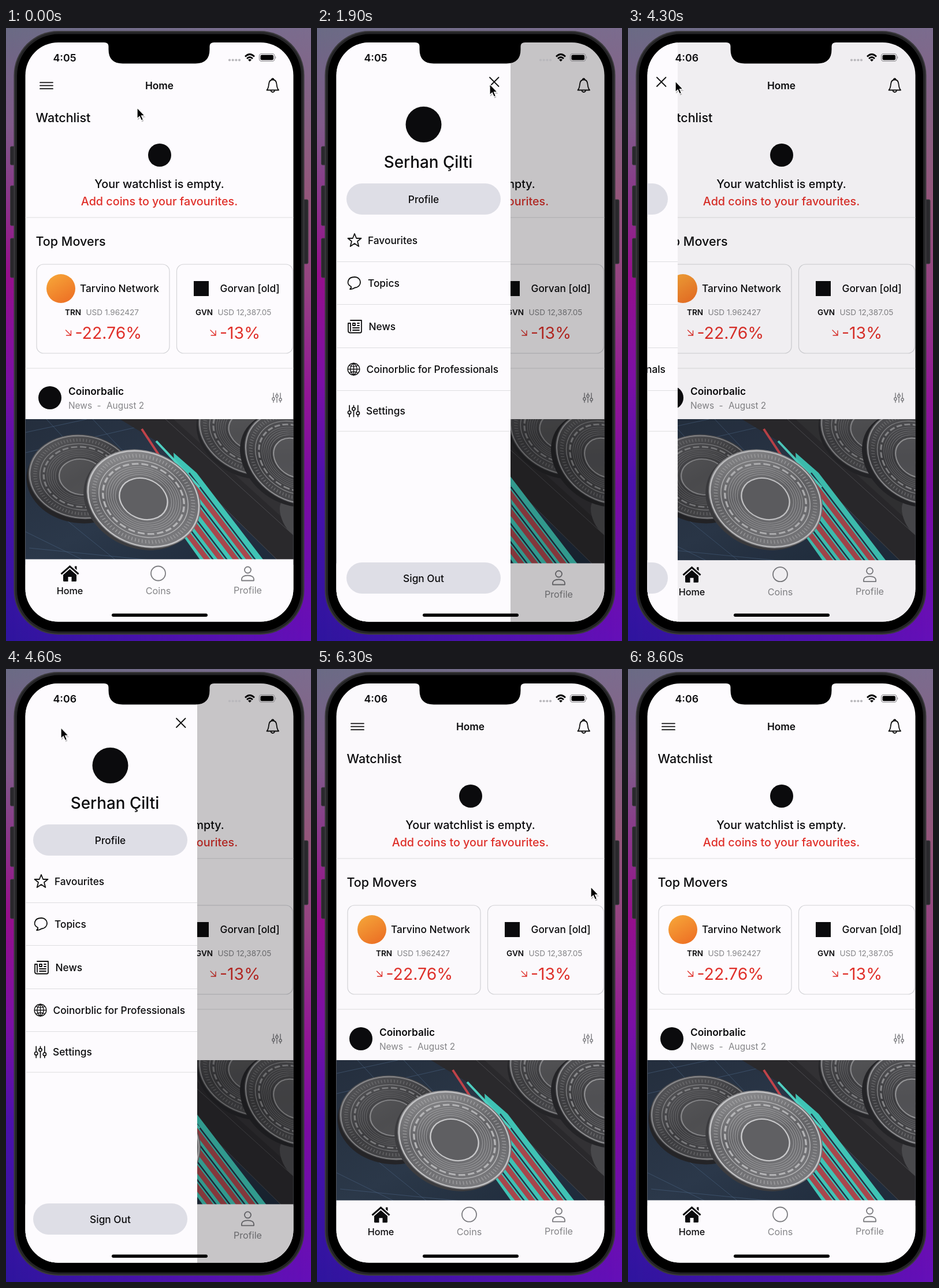
An HTML page for the animation above (8700 ms loop, 528 px wide and 1061 px high).

```html
<!DOCTYPE html>
<html lang="en">
<head>
<meta charset="utf-8">
<title>Drawer menu</title>
<style>
@property --p { syntax: "<number>"; inherits: true; initial-value: 0; }
html, body { margin: 0; width: 100%; height: 100%; overflow: hidden; background: #5a1a90; }
svg.stage {
  display: block; width: 100%; height: 100%;
  font-family: Inter, "Liberation Sans", sans-serif; font-size: 17.3px;
  /* critically damped spring */
  animation: slide 8.7s infinite linear(0, .2, .49, .706, .841, .917, .958, .979, .99, .995, 1);
}
text { fill: #0b0b0d; white-space: pre; }
.m { font-weight: 500; }
.b { font-weight: 600; }
.mid { text-anchor: middle; }
.grey { fill: #858588; }
.red { fill: #e0302a; }
.h2 { font-size: 21.5px; }
.lead { font-size: 19.75px; }
.small { font-size: 13.6px; }
.news { font-size: 15.4px; }
.pct { font-size: 28.4px; }
.tab { font-size: 16.2px; }
.clock { font-size: 17.8px; }
.ink, .soft { fill: none; stroke: #111; stroke-width: 1.8; stroke-linecap: round; stroke-linejoin: round; }
.soft { stroke: #7c7c80; }
.thin { stroke-width: 1.4; }
.fall { fill: none; stroke: #e0302a; stroke-width: 1.4; stroke-linecap: round; }
.rule { stroke: #dddde0; stroke-width: 1.2; }
.card { fill: none; stroke: #d4d4d8; stroke-width: 1.2; }
.paper { fill: #fdfbfe; }
.drawer { transform: translateX(calc((var(--p) - 1) * 327px)); }
.dim { opacity: calc(var(--p) * .22); }
.tabs { transform: translateY(calc(var(--p) * 7px)); }
.cursor { animation: point 8.7s infinite ease-in-out; }
.early { animation: early 8.7s infinite step-end; }
.late { animation: late 8.7s infinite step-end; }
@keyframes slide {
  0%, 11.494% { --p: 0; }
  16.667%, 31.736% { --p: 1; }
  36.908%, 48.851% { --p: 0; }
  54.023%, 68.966% { --p: 1; }
  74.138%, 100% { --p: 0; }
}
@keyframes point {
  0% { transform: translate(227px, 138px); }
  8%, 13.2% { transform: translate(70px, 98px); }
  20.7%, 21.9% { transform: translate(299px, 97px); }
  29.9%, 36.8% { transform: translate(305px, 96px); }
  46%, 51.7% { transform: translate(82px, 92px); }
  60.9%, 80.5% { transform: translate(474px, 377px); }
  88.5%, 100% { transform: translate(545px, 430px); }
}
@keyframes early { 0% { opacity: 1; } 41.4%, 100% { opacity: 0; } }
@keyframes late { 0% { opacity: 0; } 41.4%, 100% { opacity: 1; } }
</style>
</head>
<body>
<svg class="stage" viewBox="0 0 528 1061" preserveAspectRatio="none">
  <defs>
    <linearGradient id="wallL" x2="0" y2="1">
      <stop offset="0" stop-color="#6b6b85"/>
      <stop offset=".16" stop-color="#805a8a"/>
      <stop offset=".4" stop-color="#960f8c"/>
      <stop offset=".58" stop-color="#7a10a5"/>
      <stop offset=".74" stop-color="#4a12ac"/>
      <stop offset="1" stop-color="#2e159e"/>
    </linearGradient>
    <linearGradient id="wallR" x2="0" y2="1">
      <stop offset="0" stop-color="#7b6c8e"/>
      <stop offset=".28" stop-color="#94567a"/>
      <stop offset=".42" stop-color="#954482"/>
      <stop offset=".6" stop-color="#921696"/>
      <stop offset=".75" stop-color="#7a0ca2"/>
      <stop offset="1" stop-color="#650fb8"/>
    </linearGradient>
    <linearGradient id="fade">
      <stop offset="0" stop-color="#000"/><stop offset="1" stop-color="#fff"/>
    </linearGradient>
    <mask id="side"><rect width="528" height="1061" fill="url(#fade)"/></mask>
    <linearGradient id="amber" x2=".6" y2="1">
      <stop offset="0" stop-color="#f7a93a"/><stop offset="1" stop-color="#ee7426"/>
    </linearGradient>
    <linearGradient id="steel" x2="1" y2="1">
      <stop offset="0" stop-color="#9c9c9e"/><stop offset=".45" stop-color="#646467"/>
      <stop offset="1" stop-color="#858588"/>
    </linearGradient>
    <linearGradient id="iron" x2="1" y2="1">
      <stop offset="0" stop-color="#5e5e61"/><stop offset=".5" stop-color="#3c3c3f"/>
      <stop offset="1" stop-color="#505053"/>
    </linearGradient>
    <linearGradient id="navy" x2="1" y2="1">
      <stop offset="0" stop-color="#242e3d"/><stop offset=".5" stop-color="#2b384a"/>
      <stop offset="1" stop-color="#1c2838"/>
    </linearGradient>
    <clipPath id="screen"><rect x="33.5" y="25" width="464" height="1002.5" rx="57"/></clipPath>
    <clipPath id="photo"><rect x="33" y="677" width="465" height="252"/></clipPath>
    <g id="coin" stroke="#b4b4b6" fill="none">
      <circle r="97" stroke="#c4c4c6" stroke-width="2.5"/>
      <circle r="87" stroke-width="7" stroke-dasharray="1.6 4.4" opacity=".6"/>
      <circle r="78" stroke-width="1.5"/>
      <circle r="71" stroke-width="3.5" stroke-dasharray="12 5"/>
      <g stroke-width="1.3" opacity=".55">
        <circle r="65"/><circle r="61"/><circle r="57"/><circle r="53"/><circle r="49"/>
      </g>
      <circle r="42" fill="#606063" stroke="#c8c8ca" stroke-width="2.5"/>
    </g>
    <g id="sliders">
      <path d="M-6-8V-1M-6 5V8M0-8V-6M0 0V8M6-8V0M6 6V8"/>
      <circle cx="-6" cy="2" r="2.2"/><circle cy="-3" r="2.2"/><circle cx="6" cy="3" r="2.2"/>
    </g>
    <path id="drop" d="M0 0 9 9M9 1V9H1"/>
    <path id="streaks" d="M234 770l122 160M258 770l122 160M284 770l122 160M307 770l122 160"/>
  </defs>

  <rect width="528" height="1061" fill="url(#wallL)"/>
  <rect width="528" height="1061" fill="url(#wallR)" mask="url(#side)"/>

  <!-- handset -->
  <g fill="#29282c" stroke="#3d3c40">
    <rect x="7.5" y="205" width="8" height="32" rx="2"/>
    <rect x="7.5" y="273" width="8" height="69" rx="2"/>
    <rect x="7.5" y="364" width="8" height="68" rx="2"/>
    <rect x="514" y="297" width="9" height="111" rx="2"/>
  </g>
  <rect x="13.5" y="5" width="503" height="1045" rx="77" fill="#3a393c"/>
  <rect x="15.5" y="7" width="499" height="1041" rx="75" fill="#242426"/>
  <rect x="19" y="10.5" width="492" height="1034" rx="72" fill="#000"/>

  <g clip-path="url(#screen)">
    <rect class="paper" x="33" y="25" width="465" height="1003"/>

    <path class="ink" d="M59 94.3H81M59 99.7H81M59 105.2H81"/>
    <text class="b mid" x="265.5" y="106">Home</text>
    <path class="ink" d="M451.5 107.5H472C469.5 105 469 102 468.5 97 468 91.5 465.5 89.5 461.8 89.500S455.5 91.5 455 97C454.5 102 454 105 451.5 107.5ZM460 89C460 86.8 463.5 86.8 463.5 89M458.5 108C459 112 464.5 112 465 108"/>

    <text class="m h2" x="51.5" y="163">Watchlist</text>
    <circle cx="266" cy="220" r="20" fill="#0b0b0d"/>
    <text class="m lead mid" x="265.5" y="277">Your watchlist is empty.</text>
    <text class="m lead red mid" x="265.5" y="307">Add coins to your favourites.</text>
    <path class="rule" d="M33 328H498M33 589H498"/>
    <text class="m h2" x="51.5" y="376.5">Top Movers</text>

    <rect class="card" x="53" y="409" width="230" height="154" rx="12"/>
    <circle cx="95" cy="451" r="25" fill="url(#amber)"/>
    <text class="m" x="128" y="457">Tarvino Network</text>
    <text class="b small" x="102" y="497">TRN</text>
    <text class="small grey" x="138.5" y="497">USD 1.962427</text>
    <use href="#drop" x="103.5" y="523" class="fall"/>
    <text class="pct red" x="119.5" y="538">-22.76%</text>

    <rect class="card" x="295.5" y="409" width="201" height="154" rx="12"/>
    <rect x="325" y="438" width="26" height="26" fill="#0b0b0d"/>
    <text class="m" x="370.5" y="457">Gorvan [old]</text>
    <text class="b small" x="328" y="497">GVN</text>
    <text class="small grey" x="366.5" y="497">USD 12,387.05</text>
    <use href="#drop" x="354" y="523" class="fall"/>
    <text class="pct red" x="370" y="538">-13%</text>

    <circle cx="76" cy="640" r="20" fill="#0b0b0d"/>
    <text class="b" x="108" y="634.5">Coinorbalic</text>
    <text class="news grey" x="108" y="659">News</text>
    <text class="news grey" x="157.5" y="659">-</text>
    <text class="news grey" x="174" y="659">August 2</text>
    <use href="#sliders" x="469" y="640" class="soft thin"/>

    <!-- article picture -->
    <g clip-path="url(#photo)">
      <rect x="33" y="677" width="465" height="252" fill="url(#navy)"/>
      <path d="M34 700 140 677M34 735 230 690M34 872 150 929M90 840 200 929M40 900 330 929M70 677 110 720M150 677 210 740" stroke="#48627f" opacity=".6" fill="none"/>
      <path d="M197 677H498V929H478L262 716Z" fill="#2a292c"/>
      <path d="M290 677H498V865Z" fill="#323134"/>
      <path d="M262 716 478 929M276 677 498 878" stroke="#4b4b4f" fill="none"/>
      <path d="M290 735 330 770 452 929H342L300 870Z" fill="#3fc4b5"/>
      <use href="#streaks" stroke="#a8474d" stroke-width="9"/>
      <use href="#streaks" x="10" stroke="#213347" stroke-width="2.5"/>
      <path d="M235 694 310 808" stroke="#c0434a" stroke-width="4"/>
      <path d="M260 715 335 795" stroke="#4fd0c1" stroke-width="4"/>

      <ellipse cx="495" cy="848" rx="17" ry="34" fill="#49494c" transform="rotate(-25 495 848)"/>
      <g transform="translate(424 699) rotate(24) scale(.95 .72)">
        <circle cy="9" r="100" fill="#242427"/><circle r="100" fill="url(#iron)"/>
        <use href="#coin" opacity=".5"/>
      </g>
      <g transform="translate(500 744) rotate(36) scale(.94 .74)">
        <circle cx="-4" cy="10" r="100" fill="#242427"/><circle r="100" fill="url(#iron)"/>
        <use href="#coin" opacity=".6"/>
      </g>
      <g transform="translate(131 777) rotate(8) scale(.93 .73)">
        <circle cx="-2" cy="10" r="100" fill="#242427"/><circle r="100" fill="url(#iron)"/>
        <use href="#coin" opacity=".5"/>
      </g>
      <g transform="translate(238 815) rotate(24) scale(1.02 .82)">
        <circle cx="-3" cy="6" r="100" fill="#3c3c3f"/><circle r="100" fill="url(#steel)"/>
        <use href="#coin"/>
      </g>
    </g>

    <g class="tabs">
      <rect class="paper" x="33" y="919.5" width="465" height="120"/>
      <path fill="#0b0b0d" d="M110.5 930 126.5 944 124.5 946.3 110.5 934 96.5 946.3 94.5 944ZM119 931.5H122.5V938L119 935ZM110.5 936.5 122 946.5V956.5Q122 958 120.5 958H113.5V950H107.5V958H100.5Q99 958 99 956.5V946.5Z"/>
      <circle class="soft" cx="263.5" cy="944" r="12.5"/>
      <circle class="soft" cx="418.5" cy="938" r="5.5"/>
      <path class="soft" d="M408 956.5C407 949 413 947.5 418.5 947.5S430 949 429 956.5Z"/>
      <text class="m tab mid" x="110.5" y="980">Home</text>
      <text class="tab mid grey" x="263.5" y="980">Coins</text>
      <text class="tab mid grey" x="418.5" y="979">Profile</text>
    </g>

    <rect class="dim" x="33" y="25" width="465" height="1003"/>

    <g class="drawer">
      <rect class="paper" x="33" y="25" width="302" height="1003"/>
      <path class="ink" d="M299 85.5 314.5 101M314.5 85.5 299 101"/>
      <circle cx="184.5" cy="167" r="31" fill="#0b0b0d"/>
      <text class="m mid" x="192.5" y="242" font-size="27.8">Serhan Çilti</text>
      <g fill="#dedee6">
        <rect x="51" y="269" width="267" height="54" rx="27"/>
        <rect x="51" y="925" width="267" height="54" rx="27"/>
      </g>
      <text class="m mid" x="184.5" y="302.5">Profile</text>
      <text class="m mid" x="184.5" y="958.5">Sign Out</text>
      <path class="rule" d="M33 404.5H335M33 478.5H335M33 553.5H335M33 627.5H335M33 698H335"/>

      <path class="ink" d="M65 356 68.2 364H76.5L70 369.3 72.3 378 65 373 57.7 378 60 369.3 53.5 364H61.8Z"/>
      <path class="ink" d="M57 452C59 450.5 59.5 449 59 447.5 50 443.5 52.5 431 65 431S79 448 65.5 449.5C62 452 59.5 452.5 57 452Z"/>
      <path class="ink" d="M58 506H77V525Q77 527.5 74.5 527.5H57Q54 527.5 54 524V511H58V524.5M62 511H66V515H62ZM70 511H73M70 515H73M62 519H73M62 523H73"/>
      <g class="ink thin">
        <circle cx="63.5" cy="590.5" r="10.3"/>
        <path d="M63.5 580C56 586 56 595 63.5 601 71 595 71 586 63.5 580ZM63.5 580V601M53.5 590.5H73.5M56 584Q63.5 588 71 584M56 597Q63.5 593 71 597"/>
      </g>
      <use href="#sliders" class="ink thin" transform="translate(63.5 663) scale(1.22)"/>
      <text class="m" x="88" y="373.5">Favourites</text>
      <text class="m" x="88" y="448">Topics</text>
      <text class="m" x="89.5" y="523">News</text>
      <text class="m" x="85.5" y="597">Coinorblic for Professionals</text>
      <text class="m" x="85" y="669">Settings</text>
    </g>

    <!-- status bar -->
    <text class="b clock early" x="81.5" y="57.5">4:05</text>
    <text class="b clock late" x="81.5" y="57.5">4:06</text>
    <g fill="#b9b8bc">
      <circle cx="387" cy="55.5" r="2.1"/><circle cx="392.7" cy="55.5" r="2.1"/>
      <circle cx="398.4" cy="55.5" r="2.1"/><circle cx="404" cy="55.5" r="2.1"/>
    </g>
    <path d="M414 49.5Q422 41.5 430 49.5M417 53Q422 48 427 53" fill="none" stroke="#000" stroke-width="2.6"/>
    <path d="M422 58 419 55Q422 52.5 425 55Z"/>
    <rect x="438.5" y="44.5" width="26.5" height="13" rx="4" fill="none" stroke="#8d8c90" stroke-width="1.2"/>
    <rect x="440.5" y="46.5" width="22.5" height="9" rx="2.3"/>
    <path d="M466.3 48.5Q468.6 51 466.3 53.5Z" fill="#8d8c90"/>
    <rect x="183" y="1013.5" width="166" height="5.5" rx="2.7"/>
    <path d="M170 24H360V25Q352.500 25 352.5 32V37Q352.5 61.5 328 61.5H202Q177.5 61.5 177.5 37V32Q177.5 25 170 25Z"/>
  </g>

  <g class="cursor">
    <path d="M0 1V19.5L4.2 15.7 7.3 22.5 10.5 21 7.5 14.5H13.5Z" opacity=".25" transform="translate(1 2)"/>
    <path d="M0 0V19L4.2 15.2 7.3 22 10.5 20.5 7.5 14H13.5Z" stroke="#fff" stroke-width="1.3"/>
  </g>
</svg>
</body>
</html>
```
